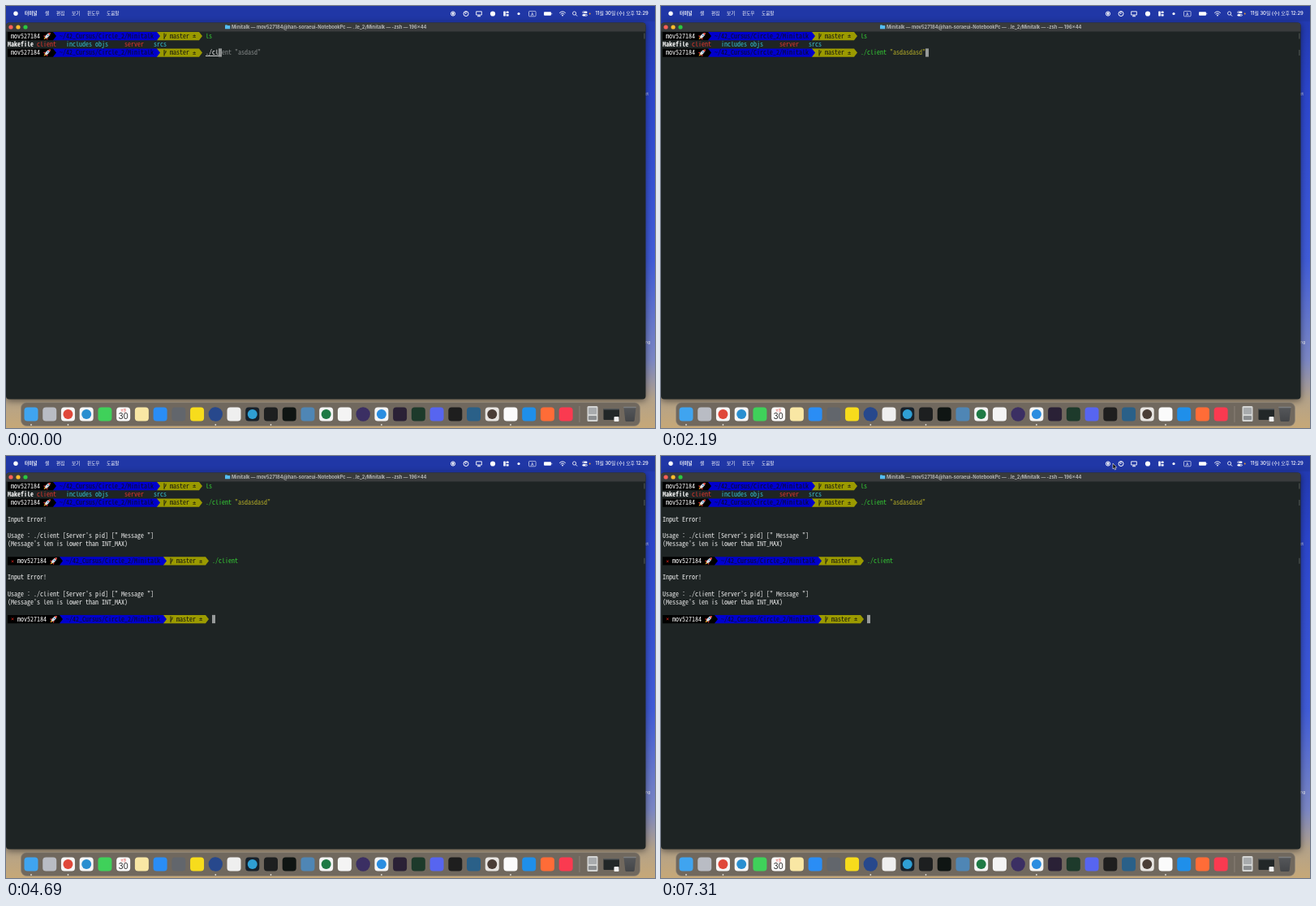
An HTML page for the animation above (7370 ms loop, 800 px wide and 520 px high).

```html
<!DOCTYPE html>
<html lang="ko">
<head>
<meta charset="utf-8">
<title>Terminal session</title>
<style>
html, body { margin: 0; width: 100%; height: 100%; overflow: hidden; background: #2636b8; }
svg { display: block; width: 800px; height: 520px; }
text { white-space: pre; }
.ui { font-family: Inter, "Noto Sans CJK KR", "Noto Sans CJK", sans-serif; }
.mono { font-family: "Noto Sans Mono CJK KR", "Noto Sans Mono CJK JP", "Noto Sans Mono", monospace; font-feature-settings: "calt" 0, "liga" 0; }
.sign { font-family: "DejaVu Sans Mono", monospace; }
#window { filter: drop-shadow(0 2px 4px rgba(0, 0, 0, .5)); }
</style>
</head>
<body>
<svg id="stage" viewBox="0 0 800 520">
  <defs>
    <linearGradient id="sky" x1="0" y1="0" x2="0" y2="1">
      <stop offset="0" stop-color="#2138ac"/>
      <stop offset=".2" stop-color="#2c46cc"/>
      <stop offset=".6" stop-color="#405cd8"/>
      <stop offset=".84" stop-color="#7c88c4"/>
      <stop offset=".93" stop-color="#b3a28a"/>
      <stop offset="1" stop-color="#c6a878"/>
    </linearGradient>
    <linearGradient id="bin" x1="0" y1="0" x2="0" y2="1">
      <stop offset="0" stop-color="#55575a"/>
      <stop offset="1" stop-color="#434548"/>
    </linearGradient>
    <g id="rocket" transform="rotate(45)">
      <path d="M-1.7 .6 L-3.6 3.4 L-1.4 3 Z M1.7 .6 L3.6 3.4 L1.4 3 Z" fill="#e0352b"/>
      <path d="M-1.2 3 L0 6 L1.2 3 Z" fill="#f5a623"/>
      <path d="M0 -5.5 Q2.2 -3 1.8 0 L1.3 3 H-1.3 L-1.8 0 Q-2.2 -3 0 -5.5" fill="#dde3e8"/>
      <path d="M0 -5.5 Q1.2 -4.4 1.6 -3 H-1.6 Q-1.2 -4.4 0 -5.5" fill="#e0352b"/>
      <circle cy="-1.2" r=".9" fill="#3d7fc0"/>
    </g>
  </defs>
  <rect width="800" height="520" fill="url(#sky)"/>
  <g id="desktop" class="ui"></g>
  <g id="window">
    <rect y="20.5" width="788.5" height="464" rx="4" fill="#1e2424"/>
    <path d="M0 31.5 V24.5 Q0 20.5 4 20.5 H784.5 Q788.5 20.5 788.5 24.5 V31.5 Z" fill="#393b3c"/>
  </g>
  <g id="titlebar" class="ui"></g>
  <g id="term" class="mono"></g>
  <g id="dock" class="ui"></g>
  <g id="pointer">
    <path id="beam" d="M-2 -3.6 Q0 -3.6 0 -2.4 Q0 -3.6 2 -3.6 M0 -2.4 V2.4 M-2 3.6 Q0 3.6 0 2.4 Q0 3.6 2 3.6 M-1 1 H1" fill="none" stroke="#e8e8e8" stroke-width=".8"/>
    <path id="arrow" d="M0 -3 V4 L1.5 2.7 L2.6 5 L3.7 4.5 L2.7 2.2 H4.7 Z" fill="#000" stroke="#fff" stroke-width=".6"/>
  </g>
</svg>
<script>
const $ = id => document.getElementById(id);
const LOOP = 7370, COL = 4, ROW = 10.25, LEFT = 2, TOP = 37;
const USER = 'mov527184';
const GREEN = '#35d035', STRING = '#b5ad28', GREY = '#858989';

const text = (x, y, s, fill, size, more = '') =>
  `<text x="${x}" y="${y}" fill="${fill}" font-size="${size}" ${more}>${s}</text>`;
const rect = (x, y, w, h, fill, rx = 0) =>
  `<rect x="${x}" y="${y}" width="${w}" height="${h}" rx="${rx}" fill="${fill}"/>`;
const dot = (x, y, r, fill) => `<circle cx="${x}" cy="${y}" r="${r}" fill="${fill}"/>`;
const line = (d, w = .9, color = '#fff') =>
  `<path d="${d}" fill="none" stroke="${color}" stroke-width="${w}"/>`;

// Font size at which one monospace cell is COL wide
const pen = document.createElement('canvas').getContext('2d');
pen.font = `100px ${getComputedStyle($('term')).fontFamily}`;
const MONO = COL * 100 / pen.measureText('m').width;

function drawDesktop() {
  const menus = [[48, '셸'], [62, '편집'], [81, '보기'], [100, '윈도우'], [124, '도움말']];
  $('desktop').innerHTML =
    rect(0, 0, 800, 19, '#2037a6') +
    dot(12, 9.3, 2.7, '#fff') +
    text(23, 11.3, '터미널', '#fff', 5.6, 'font-weight="700"') +
    menus.map(([x, s]) => text(x, 11.3, s, '#fff', 5.6, 'font-weight="500"')).join('') +
    // status icons
    '<circle cx="551" cy="9.5" r="2.6" fill="none" stroke="#fff" stroke-width="1"/>' + dot(551, 9.5, 1.4, '#fff') +
    '<circle cx="567" cy="9.5" r="3" fill="none" stroke="#fff"/>' + line('M567 6.5 V9.7 L565.5 8.5') +
    line('M579.7 6.8 H586.3 V11 H579.7 Z M583 11 V12.6 M581 12.7 H585') +
    dot(600, 9.5, 3.1, '#fff') +
    rect(613.2, 6.5, 2.6, 6, '#fff', .4) + rect(616.6, 6.5, 3, 2.6, '#fff', .4) + rect(616.6, 9.9, 3, 2.6, '#fff', .4) +
    dot(632, 9.5, 1.6, '#fff') +
    '<rect x="644.5" y="6.4" width="8.6" height="6.4" rx="1" fill="none" stroke="#fff" stroke-width=".6"/>' +
    text(648.8, 11.5, 'A', '#fff', 5, 'text-anchor="middle"') +
    rect(663, 7.3, 9, 4.4, '#fff', 1) + rect(672.5, 8.7, .7, 1.6, '#fff') +
    line('M682.2 8.6 Q686 5.2 689.8 8.6 M683.6 10.2 Q686 8 688.4 10.2') + dot(686, 11.6, .9, '#fff') +
    '<circle cx="700.6" cy="9" r="2.1" fill="none" stroke="#fff" stroke-width=".8"/>' + line('M702.1 10.5 L704 12.5') +
    rect(710.5, 6.5, 6, 2.6, '#fff', 1.3) + dot(712, 7.8, .8, '#2037a6') +
    rect(710.5, 9.9, 6, 2.6, '#fff', 1.3) + dot(715, 11.2, .8, '#2037a6') +
    dot(719.7, 9.5, .9, '#f29a2e') +
    text(726.5, 11.4, '11월 30일 (수) 오후 12:29', '#fff', 5.9, 'font-weight="500"') +
    // file labels that stick out beside the window
    text(787.5, 110, 'ct', '#fff', 5) + text(788, 416, 'ng', '#fff', 5);
}

function drawTitlebar() {
  $('titlebar').innerHTML =
    ['#ff5f57', '#febc2e', '#28c840'].map((c, i) => dot(6 + 9 * i, 26, 2.6, c)).join('') +
    rect(270, 23.2, 3, 2, '#3fa9de', .5) + rect(270, 24, 6.3, 4.3, '#55bdf0', .6) +
    text(278, 28, `Minitalk — ${USER}@han-soraeui-NotebookPc — ..le_2/Minitalk — -zsh — 196×44`,
      '#b4b6b6', 5.75, 'font-weight="700"');
}

function drawDock() {
  // tile colour, then an optional disc colour
  const apps = [
    ['#3fa4f0'], ['#b9bcc4'], ['#f6f6f6', '#e0483a'], ['#f6f6f6', '#2a8fd0'], ['#3fd15a'],
    ['#fafafa'], ['#f9e7a4'], ['#2a8df5'], ['#62666c'], ['#f7dc1c'],
    ['', '#27488c'], ['#efefef'], ['#17212b', '#2f9fd4'], ['#1d1f20'], ['#0f1513'],
    ['#4f86b5'], ['#f4f4f4', '#1f7a45'], ['#f4f4f4'], ['', '#3b2f63'], ['#f4f4f4', '#2a8de0'],
    ['#2a2136'], ['#1d3a2b'], ['#5765f0'], ['#1e1e1e'], ['#2a6088'],
    ['#e8e5e2', '#4a3d36'], ['#fbfbfb'], ['#1f8fea'], ['#ff6c37'], ['#fa3a50']
  ];
  const at = i => 31 + 22.73 * i;
  const icon = ([tile, disc], i) =>
    (tile ? rect(at(i) - 8.5, 494.5, 17, 17, tile, 4) : '') +
    (disc ? dot(at(i), 503, tile ? 6 : 8.7, disc) : '');
  $('dock').innerHTML =
    '<rect x="18.5" y="488.5" width="763" height="29" rx="7" fill="#70685e" stroke="#8f877b" stroke-width=".6"/>' +
    apps.map(icon).join('') +
    text(at(5), 499.6, '11월', '#e5443b', 4, 'text-anchor="middle"') +
    text(at(5), 509, '30', '#333', 10, 'text-anchor="middle"') +
    [0, 2, 10, 13, 19, 26].map(i => dot(at(i), 516, .9, '#e4e0d8')).join('') +
    rect(706.6, 493, .7, 20, '#958d82') +
    rect(716.5, 493, 13, 19, '#d4d5d4', 1.5) + rect(718, 495, 10, 8, '#a8abad', 1) + rect(718, 505, 10, 5, '#8b8e90', 1) +
    rect(736.5, 496, 19.5, 14, '#222728', 1) + rect(736.5, 496, 19.5, 1.5, '#55585a') + rect(749.5, 506, 6, 6, '#f0f0f0', 1) +
    '<path d="M761.5 494.5 H776.5 L774.7 510.5 Q774.5 512 773 512 H765 Q763.5 512 763.3 510.5 Z" fill="url(#bin)"/>' +
    rect(761, 493.7, 16, 1.6, '#7d7f81', .8);
}

// Terminal cells
const colX = c => LEFT + COL * c;
const rowY = r => TOP + ROW * r;
const put = (c, r, s, fill = '#f2f2f2', more = '') => text(colX(c), rowY(r) + 2.6, s, fill, MONO, more);
const sign = (c, r, s, fill) => text(colX(c), rowY(r) + 2.4, s, fill, 7, 'class="sign"');

function segment(c0, c1, r, fill) {
  const y = rowY(r), h = ROW / 2, x = colX(c1);
  return `<path d="M${colX(c0)} ${y - h} H${x} L${x + COL} ${y} L${x} ${y + h} H${colX(c0)} Z" fill="${fill}"/>`;
}

function prompt(r, failed) {
  const c = failed ? 2 : 0, y = rowY(r), bx = colX(c + 48);
  return segment(c + 46, c + 59, r, '#9b9a00') + segment(c + 14, c + 46, r, '#0000cd') + segment(0, c + 14, r, '#000') +
    (failed ? sign(1, r, '×', '#d8261c') : '') +
    put(c + 1, r, USER, '#fff', 'font-weight="500"') +
    `<use href="#rocket" x="0" y="0" transform="translate(${colX(c + 12.2)} ${y})"/>` +
    put(c + 16, r, '~/42_Cursus/Circle_2/Minitalk', '#0c0c1c') +
    line(`M${bx + 1} ${y - 3.5} V${y + 4} M${bx + 1} ${y + 2} Q${bx + 3.2} ${y + 1} ${bx + 3.2} ${y - 2.5}`, .9, '#111') +
    put(c + 50, r, 'master', '#111') + sign(c + 57, r, '±', '#111');
}

function command(c, r, typed) {
  const name = typed.split(' ')[0], known = name === 'ls' || name === './client';
  return put(c, r, name, known ? GREEN : '#fff', known ? '' : 'text-decoration="underline"') +
    put(c + name.length, r, typed.slice(name.length), STRING);
}

function inputLine(c, r, typed, past) {
  const hint = typed && past.startsWith(typed) ? past.slice(typed.length) : '';
  const end = c + typed.length;
  return command(c, r, typed) + rect(colX(end), rowY(r) - ROW / 2, COL, ROW, '#979a9a') +
    put(end, r, hint.slice(0, 1), '#6a6d6d') + put(end + 1, r, hint.slice(1), GREY);
}

const mark = r => rect(786.6, rowY(r) - 3.5, .7, 7, '#6f7373');
const usage = r => put(0, r, 'Input Error!') +
  put(0, r + 2, 'Usage : ./client [Server\'s pid] [" Message "]') +
  put(0, r + 3, "(Message's len is lower than INT_MAX)");

// Linear interpolation through [time, value] points
function track(points, t) {
  let [t0, v0] = points[0];
  for (const [t1, v1] of points) {
    if (t < t1) return t <= t0 ? v0 : v0 + (v1 - v0) * (t - t0) / (t1 - t0);
    [t0, v0] = [t1, v1];
  }
  return v0;
}

const FIRST = './client "asdasdasd"', SECOND = './client ';
const ENTER1 = 2500, ENTER2 = 4400;
const keys1 = [[0, 4], [700, 9], [950, 9], [2050, 20]];
const keys2 = [[2700, 0], [3600, 9]];

const listing = ['Makefile', 'client', 'includes', 'objs', 'server', 'srcs'].map((s, i) =>
  put(9 * i, 1, s, i === 0 ? '#fff' : i % 3 === 1 ? '#e2372d' : '#35c3d2', i ? '' : 'font-weight="700"')).join('');

function drawTerminal(n1, n2, stage) {
  let out = prompt(0) + command(61, 0, 'ls') + mark(0) + listing + prompt(2);
  if (n1 > 6) out += mark(2);
  out += stage ? command(61, 2, FIRST) : inputLine(61, 2, FIRST.slice(0, n1), './client "asdasd"');
  if (stage > 0) {
    out += usage(4) + prompt(9, true) + (n2 > 6 ? mark(9) : '');
    out += stage > 1 ? command(63, 9, SECOND) : inputLine(63, 9, SECOND.slice(0, n2), FIRST);
  }
  if (stage > 1) out += usage(11) + prompt(16, true) + inputLine(63, 16, '', '');
  $('term').innerHTML = out;
}

const pathX = [[5950, 152], [6130, 158], [6300, 215], [6550, 400], [6800, 530], [7000, 553], [7200, 557]];
const pathY = [[5950, 205], [6130, 191], [6300, 150], [6550, 70], [6800, 14], [7000, 8], [7200, 12]];

function drawPointer(t) {
  const x = track(pathX, t), y = track(pathY, t), overTerm = y > 31;
  $('pointer').setAttribute('transform', `translate(${x} ${y})`);
  $('pointer').style.display = t < 5950 ? 'none' : '';
  $('beam').style.display = overTerm ? '' : 'none';
  $('arrow').style.display = overTerm ? 'none' : '';
}

let shown = '';
function frame() {
  const t = performance.now() % LOOP;
  const state = [Math.floor(track(keys1, t)), Math.floor(track(keys2, t)), (t >= ENTER1) + (t >= ENTER2)];
  if (shown !== String(state)) {
    shown = String(state);
    drawTerminal(...state);
  }
  drawPointer(t);
  requestAnimationFrame(frame);
}

drawDesktop();
drawTitlebar();
drawDock();
frame();
</script>
</body>
</html>
```
